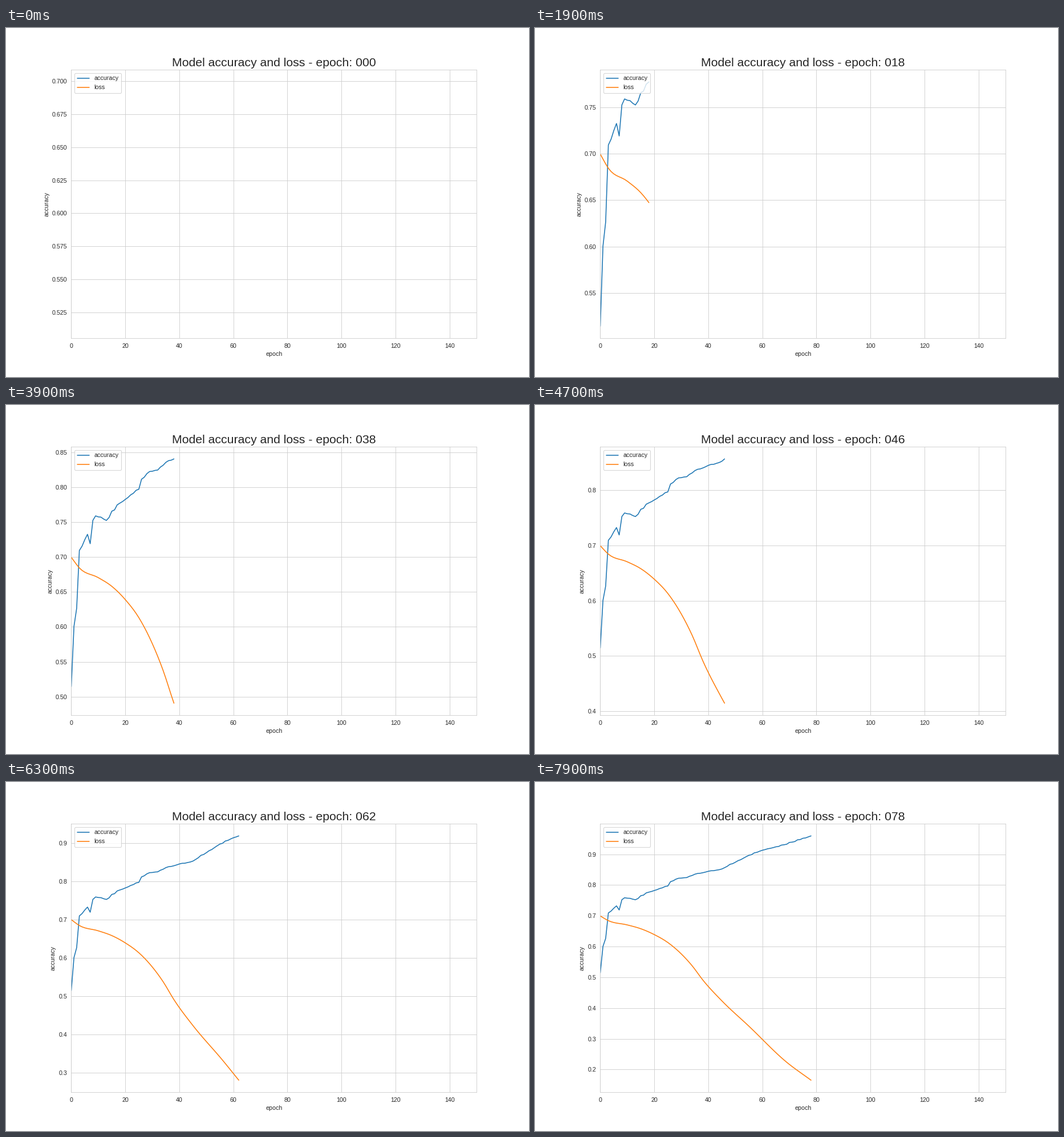
Animation of 917x611 px, one loop 8000 ms. Source, as a matplotlib script:

```python
import numpy as np
import matplotlib.pyplot as plt
from matplotlib.animation import FuncAnimation

W, H, DPI = 917, 611, 76.4
FRAMES, STEP_MS = 80, 100
EPOCHS = 150

plt.rcParams.update({
    "font.family": "Liberation Sans",
    "font.size": 10,
    "text.color": ".15",
    "axes.labelcolor": ".15",
    "axes.edgecolor": ".8",
    "axes.linewidth": 0.8,
    "axes.axisbelow": True,
    "axes.grid": True,
    "grid.color": ".8",
    "grid.linewidth": 0.8,
    "xtick.color": ".15",
    "ytick.color": ".15",
    "xtick.bottom": False,
    "ytick.left": False,
    "xtick.major.pad": 4.6,
    "lines.linewidth": 1.5,
    "lines.solid_capstyle": "round",
})

# Turning points of the two curves: (epoch, value)
ACC_KEYS = [(0, .5145), (1, .6005), (2, .6266), (3, .7093), (6, .7324),
            (7, .719), (8, .7524), (9, .7588), (13, .7523), (17, .7746),
            (25, .7969), (26, .8112), (29, .8223), (32, .8244), (36, .8378),
            (45, .8524), (55, .8969), (59, .9103), (68, .9312), (78, .96)]
LOSS_KEYS = [(0, .6995), (3, .6843), (10, .6704), (15, .658), (20, .6389),
             (25, .6132), (30, .5759), (34, .5375), (38, .4907),
             (45, .4234), (55, .341), (69, .2236), (78, .1652)]


def smooth(x, keys):
    """Cubic Hermite curve through the key points."""
    xs, ys = np.array(keys, float).T
    slope = np.gradient(ys, xs)
    k = np.clip(np.searchsorted(xs, x, side="right") - 1, 0, len(xs) - 2)
    h = xs[k + 1] - xs[k]
    t = (x - xs[k]) / h
    return ((1 + 2 * t) * (1 - t) ** 2 * ys[k]
            + t * (1 - t) ** 2 * h * slope[k]
            + t * t * (3 - 2 * t) * ys[k + 1]
            + t * t * (t - 1) * h * slope[k + 1])


def jagged(x, keys, noise=.0009):
    """Straight runs between the key points, with a slight wobble."""
    xs, ys = np.array(keys, float).T
    wobble = np.random.default_rng(4).normal(0, noise, len(x))
    return np.interp(x, xs, ys) + np.where(np.isin(x, xs), 0, wobble)


epochs = np.arange(FRAMES - 1)
accuracy = jagged(epochs, ACC_KEYS)
loss = smooth(epochs, LOSS_KEYS)

# The small excess keeps the pixel size from rounding down
fig = plt.figure(figsize=((W + .01) / DPI, (H + .01) / DPI), dpi=DPI)
ax = fig.add_axes((114.43 / W, 67.53 / H, 710.67 / W, 470.47 / H))
acc_line, = ax.plot([], [], color="#1f77b4", label="accuracy")
loss_line, = ax.plot([], [], color="#ff7f0e", label="loss")
ax.set_xlim(0, EPOCHS)
ax.set_xlabel("epoch")
ax.set_ylabel("accuracy")
title = ax.set_title("", fontsize=20)
ax.legend(loc="upper left", borderaxespad=.53, borderpad=.45,
          labelspacing=.55)


def update(i):
    epoch = max(0, i - 1)
    n = epoch + 1
    acc_line.set_data(epochs[:n], accuracy[:n])
    loss_line.set_data(epochs[:n], loss[:n])
    shown = np.concatenate([accuracy[:n], loss[:n]])
    pad = 0.05 * np.ptp(shown)
    ax.set_ylim(shown.min() - pad, shown.max() + pad)
    title.set_text(f"Model accuracy and loss - epoch: {epoch:03d}")
    return acc_line, loss_line, title


anim = FuncAnimation(fig, update, frames=FRAMES, init_func=lambda: update(0),
                     interval=STEP_MS, repeat=True, repeat_delay=0, blit=False)
plt.show()
```
